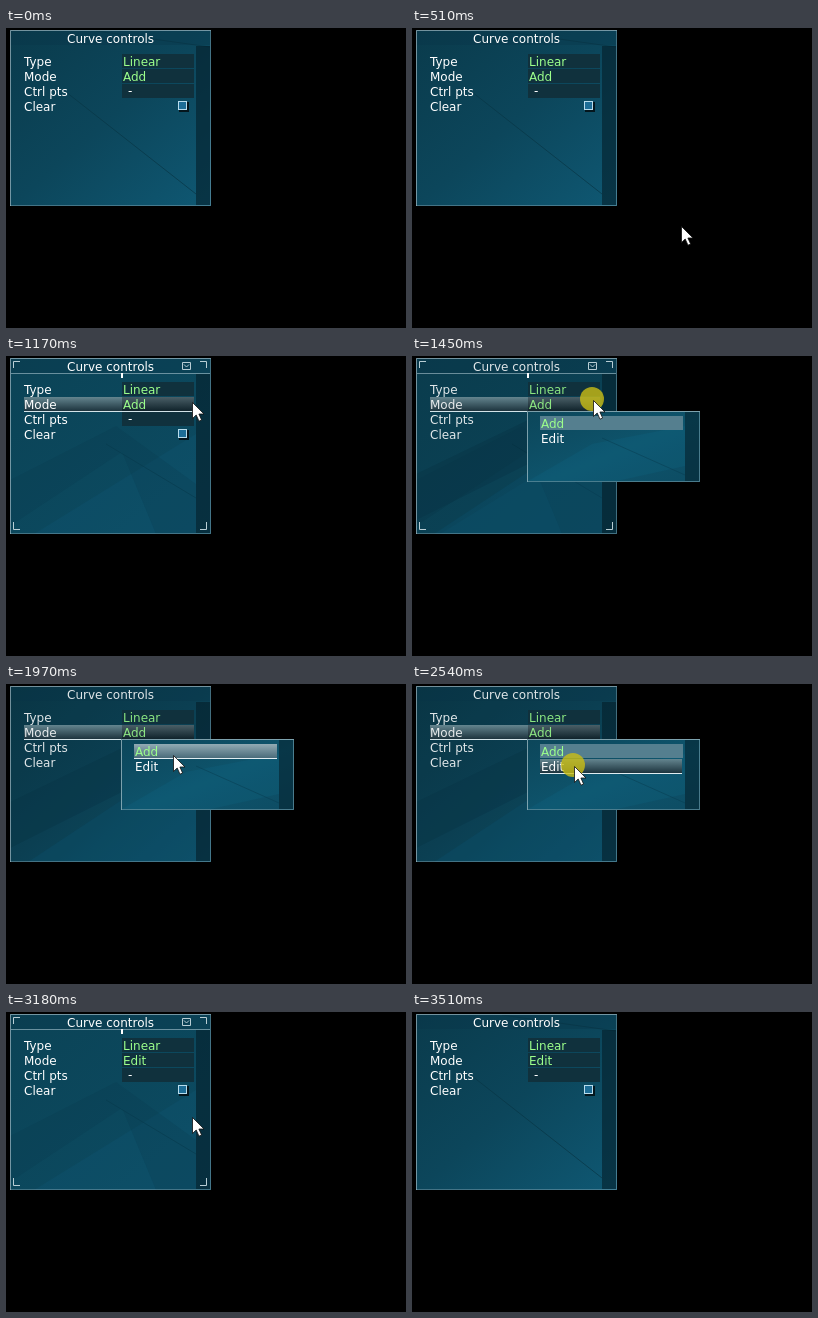
An HTML page for the animation above (4950 ms loop, 400 by 300 pixels).

```html
<!DOCTYPE html>
<html lang="en">
<head>
<meta charset="utf-8">
<title>Curve controls</title>
<style>
html, body { margin: 0; width: 100%; height: 100%; overflow: hidden; background: #000; }
svg { display: block; width: 400px; height: 300px; }
text { font: 12px "DejaVu Sans", sans-serif; fill: #fff; }
.value { fill: #9cff8c; }
.mark { fill: none; stroke: #b9ced5; }
</style>
</head>
<body>
<svg viewBox="0 0 400 300">
  <defs>
    <linearGradient id="body" x1="0" y1="0" x2="1" y2="1">
      <stop offset="0" stop-color="#0a3b4c"/><stop offset=".5" stop-color="#0c465b"/><stop offset="1" stop-color="#0f5873"/>
    </linearGradient>
    <linearGradient id="bodyHover" x1="0" y1="0" x2="1" y2="1">
      <stop offset="0" stop-color="#0b4356"/><stop offset="1" stop-color="#0c4c63"/>
    </linearGradient>
    <linearGradient id="menuBody" x1="0" y1="0" x2="1" y2="1">
      <stop offset="0" stop-color="#0c465a"/><stop offset=".55" stop-color="#0e546c"/><stop offset="1" stop-color="#0d4c63"/>
    </linearGradient>
    <linearGradient id="rowGlow" x2="0" y2="1">
      <stop offset="0" stop-color="#64858f"/><stop offset="1" stop-color="#1d343e"/>
    </linearGradient>
    <linearGradient id="fieldGlow" x2="0" y2="1">
      <stop offset="0" stop-color="#4a5f67"/><stop offset="1" stop-color="#10232b"/>
    </linearGradient>
    <linearGradient id="pickGlow" x2="0" y2="1">
      <stop offset="0" stop-color="#92abb4"/><stop offset="1" stop-color="#4a6c7a"/>
    </linearGradient>
    <linearGradient id="rightShade">
      <stop offset=".3" stop-color="#06202a" stop-opacity="0"/><stop offset="1" stop-color="#06202a" stop-opacity=".55"/>
    </linearGradient>
  </defs>

  <g id="panel">
    <rect x="4" y="2" width="201" height="176" fill="url(#body)"/>
    <g id="plainLook">
      <path d="M60 64L190 166M90 3L204 19" stroke="#083747" stroke-opacity=".75" fill="none"/>
    </g>
    <g id="hoverLook">
      <rect x="4" y="2" width="201" height="176" fill="url(#bodyHover)"/>
      <path d="M28 178L190 78V178Z" fill="#10597a" fill-opacity=".25"/>
      <path d="M4 124L110 70L190 128V178H150L116 96L4 170Z" fill="#0a3a4c" fill-opacity=".25"/>
      <path d="M100 88L190 142" stroke="#083b4d" stroke-opacity=".6"/>
    </g>
    <g id="dimLook">
      <path d="M22 178L116 116L190 92V178Z" fill="#0e5f7d" fill-opacity=".28"/>
      <path d="M4 118L116 64V108L4 164Z" fill="#06303f" fill-opacity=".22"/>
      <rect x="4" y="2" width="201" height="176" fill="#000" fill-opacity=".1"/>
    </g>
    <rect x="4" y="3" width="200" height="14" fill="#083445" fill-opacity=".3"/>
    <rect x="190" y="18" width="14" height="159" fill="#04202b" fill-opacity=".62"/>
    <path d="M4.5 178V2.5H205" class="mark" stroke-opacity=".6"/>
    <path d="M204.5 3V177.5H4" class="mark" stroke-opacity=".32"/>
    <g fill="#10313d">
      <rect x="116" y="26" width="72" height="14"/>
      <rect x="116" y="41" width="72" height="14"/>
      <rect x="116" y="56" width="72" height="14"/>
    </g>
    <g id="modeGlow">
      <rect x="18" y="41" width="98" height="14" fill="url(#rowGlow)"/>
      <rect x="116" y="41" width="72" height="14" fill="url(#fieldGlow)"/>
      <rect x="18" y="55" width="170" height="1" fill="#d3e4e9"/>
    </g>
    <g id="clearGlow">
      <rect x="18" y="71" width="169" height="14" fill="url(#rowGlow)"/>
      <rect x="18" y="71" width="169" height="14" fill="url(#rightShade)"/>
      <rect x="18" y="85" width="169" height="1" fill="#d3e4e9"/>
    </g>
    <g id="panelText">
      <text x="61" y="15">Curve controls</text>
      <text x="18" y="38">Type</text><text x="117" y="38" class="value">Linear</text>
      <text x="18" y="53">Mode</text><text x="117" y="53" class="value" id="modeValue">Add</text>
      <text x="18" y="68">Ctrl pts</text><text x="122" y="67">-</text>
      <text x="18" y="83">Clear</text>
    </g>
    <rect x="173" y="74" width="10" height="10" fill="#04161d"/>
    <rect x="172.5" y="73.5" width="8" height="8" id="box" stroke="#b8dcec"/>
    <g id="hoverMarks">
      <rect x="5" y="17" width="199" height="1" fill="#a8c4cd" fill-opacity=".6"/>
      <rect x="115" y="17" width="2" height="5" fill="#fff"/>
      <path class="mark" d="M7.5 12V5.5H14M194 5.5H200.5V12M7.5 166V173.5H14M194 173.5H200.5V166"/>
      <path class="mark" d="M176.5 6.5H184.5V13.5H176.5ZM178 8.5L180.5 11L183 8.5"/>
    </g>
  </g>

  <g id="menu">
    <rect x="115" y="55" width="173" height="71" fill="url(#menuBody)"/>
    <path d="M116 125L180 88L273 70V110L205 125Z" fill="#11688a" fill-opacity=".22"/>
    <path d="M190 82L273 119" stroke="#083f53" stroke-opacity=".55"/>
    <rect x="273" y="56" width="14" height="69" fill="#04202b" fill-opacity=".55"/>
    <path d="M115.5 126V55.5H288" class="mark" stroke-opacity=".65"/>
    <path d="M287.5 56V125.5H116" class="mark" stroke-opacity=".35"/>
    <rect x="128" y="60" width="143" height="14" fill="#557f8f"/>
    <g id="addGlow">
      <rect x="128" y="60" width="143" height="14" fill="url(#pickGlow)"/>
      <rect x="128" y="74" width="143" height="1" fill="#e0edf1"/>
    </g>
    <g id="editGlow">
      <rect x="128" y="75" width="142" height="14" fill="url(#rowGlow)"/>
      <rect x="128" y="89" width="142" height="1" fill="#e0edf1"/>
    </g>
    <text x="129" y="72" class="value">Add</text>
    <text x="129" y="87">Edit</text>
  </g>

  <g id="pointer">
    <circle id="press" cx="-1" cy="-1" r="12" fill="#cabe14" fill-opacity=".8"/>
    <path d="M.5 .5V16.5L4.2 13L7 19.2L9.6 18L6.9 12H12Z" fill="#fff" stroke="#111" stroke-width=".8"/>
  </g>
</svg>
<script>
const LOOP = 4950;
const part = id => document.getElementById(id);
const show = (id, on) => part(id).setAttribute("visibility", on ? "visible" : "hidden");

// start, end, gaps between steps, easing of step k, from, to
const moves = [
  { start: 370, end: 890, gaps: 11, ease: k => 1 - (1 - k / 11) ** 1.5, from: [312, 288], to: [200, 50] },
  { start: 930, end: 1270, gaps: 6, ease: k => (k + 1) / 7, from: [200, 50], to: [181, 44] },
  { start: 1780, end: 2170, gaps: 8, ease: k => 1 - (1 - (k + 1) / 9) ** 1.55, from: [181, 44], to: [162, 82] },
  { start: 3140, end: 3510, gaps: 8, ease: k => Math.min(1, (k + 1) / 8) ** 1.5, from: [162, 82], to: [352, 268] }
];

function pointerAt(t) {
  const move = moves.filter(m => t >= m.start).pop();
  if (!move || t >= 3510) return null;
  const step = Math.floor((t - move.start) / (move.end - move.start) * move.gaps + .15);
  const p = move.ease(Math.min(move.gaps, step));
  return move.from.map((a, i) => Math.round(a + (move.to[i] - a) * p));
}

function draw(t) {
  const tip = pointerAt(t);
  const [x, y] = tip || [-50, -50];
  const within = (left, top, right, bottom) => x >= left && x < right && y >= top && y < bottom;
  const menu = t >= 1450 && t < 2670;
  const settled = t < 1780 || t >= 2730;
  const hover = settled && within(4, 2, 204, 178);
  const clear = hover && !menu && within(18, 71, 188, 86);

  show("plainLook", !hover && !menu);
  show("hoverLook", hover);
  show("dimLook", menu);
  show("hoverMarks", hover);
  show("modeGlow", menu || hover && within(18, 41, 188, 56));
  show("clearGlow", clear);
  part("panelText").setAttribute("opacity", menu ? .87 : 1);
  part("modeValue").textContent = t < 2670 ? "Add" : "Edit";
  part("box").setAttribute("fill", clear ? "#20262a" : "#1d6d96");

  show("menu", menu);
  show("addGlow", menu && within(128, 60, 271, 75));
  show("editGlow", menu && within(128, 75, 271, 90));

  show("pointer", tip);
  show("press", t >= 1450 && t < 1550 || t >= 2540 && t < 2670);
  part("pointer").setAttribute("transform", `translate(${x} ${y})`);
}

const begin = performance.now();
function tick() {
  draw((performance.now() - begin) % LOOP);
  requestAnimationFrame(tick);
}
draw(0);
requestAnimationFrame(tick);
</script>
</body>
</html>
```
